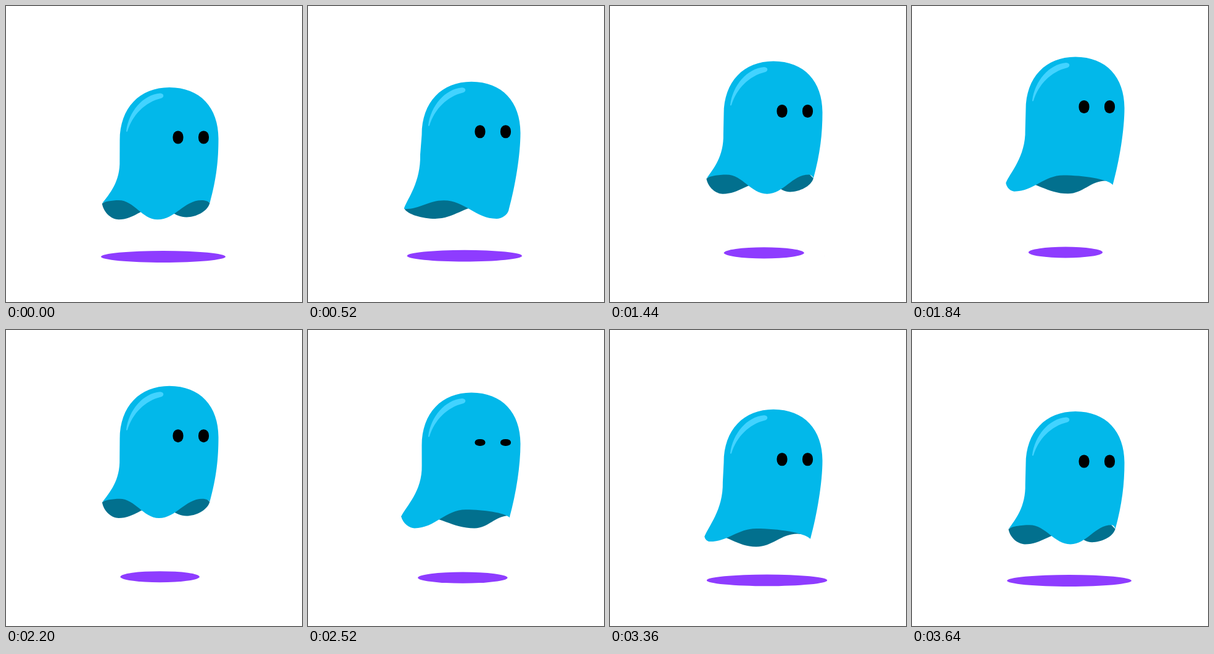
An HTML page for the animation above (3.68 s loop, 480 by 480 pixels).

```html
<!DOCTYPE html>
<html lang="en">
<head>
<meta charset="utf-8">
<title>Floating ghost</title>
<style>
  html, body { margin: 0; width: 100%; height: 100%; overflow: hidden; background: #fff; }
  svg { display: block; width: 100vw; height: 100vh; }
</style>
</head>
<body>
<svg viewBox="0 0 480 480">
  <ellipse id="shadow" fill="#8e3cff"/>
  <g id="ghost">
    <path id="back" fill="#02708e"/>
    <path id="front" fill="#02b8ea"/>
    <path fill="#42d3ff" d="M195 203C199 171 222 144 250 141.5C257 142 256.5 148 252 149.5C225 156 205 177 197 203Q195.5 205 195 203Z"/>
    <g id="eyes">
      <rect x="270.5" y="-10.5" width="17" height="21" rx="8" ry="9.5"/>
      <rect x="312" y="-10.5" width="17" height="21" rx="8" ry="9.5"/>
    </g>
  </g>
</svg>
<script>
const LOOP = 3680, HALF = LOOP / 2, WAVES = 5, STEP = 40;
const $ = id => document.getElementById(id);

const mix = (a, b, k) => a + (b - a) * k;
const curve = (u, a, b) => 3 * (1 - u) ** 2 * u * a + 3 * (1 - u) * u * u * b + u ** 3;
const smooth = u => curve(u, 0, 1);
const cosAt = (p, peak) => Math.cos(2 * Math.PI * (p - peak));
const span = (q, from, to) => (q - from) / (to - from);

// How far each ripple has travelled from the right corner (0) to the left (1).
const frontTrough = q => {
  const u = span(q, .62, 1.8);
  return u < 0 || u > 1 ? -1 : Math.sin(u * Math.PI / 2);
};
const frontCrest = q => span(q, .9, 2.2);
const backTrough = q => .63 * (q - 1) + .16 + .13 * cosAt(q, .82);
const backCrest = q => span(q, .42, 1.6);

// Active ripples of one kind; "fade" grows the ripple out of each corner.
function ripples(travel, y, p, L, R, fade = () => 1) {
  return [p, p + 1, p + 2].map(travel)
    .filter(f => f > 0 && f < 1)
    .map(f => [mix(R[0], L[0], f), mix(f < .5 ? R[1] : L[1], y, Math.min(1, fade(f)))]);
}

// Curve from the left corner through the ripples to the right corner.
function hem(nodes, L, R) {
  const pts = [L, ...nodes.sort((a, b) => a[0] - b[0]), R];
  return pts.slice(1).map((b, i) => {
    const a = pts[i], dx = b[0] - a[0], dy = b[1] - a[1];
    const c1 = i === 0 ? [a[0] + .1 * dx, a[1] + .6 * dy] : [a[0] + .4 * dx, a[1]];
    const c2 = i === pts.length - 2 ? [b[0] - .1 * dx, b[1] - .6 * dy] : [b[0] - .4 * dx, b[1]];
    return `C${c1} ${c2} ${b}`;
  }).join('');
}

function drawBody(p) {
  const s = -cosAt(p, .11);
  const L = [154 - 3 * cosAt(p, .35), 328.5 + 10.5 * s];
  const R = [328 - 3.2 * s, 329.5 + 13 * s];
  const waist = 184 + 2 * cosAt(p, .22);
  const low = 350 + 5 * s;

  const front = hem([
    ...ripples(frontTrough, low, p, L, R, f => 10 * Math.min(f, 1 - f)),
    ...ripples(frontCrest, 319.5 + 6 * s, p, L, R)
  ], L, R);
  const back = hem([
    ...ripples(backTrough, low, p, L, R, f => Math.min(4 * f, 10 * (1 - f))),
    ...ripples(backCrest, 330 + 4 * s, p, L, R)
  ], L, R);

  $('back').setAttribute('d', `M${L}${back}L260 250Z`);
  $('front').setAttribute('d',
    `M${L}${front}C${R[0] + 11} ${R[1] - 40} 344.5 250 344.5 215` +
    `C344.5 165 315 132 265 132C217 132 184.5 165 184.5 218L${waist} 250` +
    `C${waist + 1} ${290 + 6 * s} ${L[0] + 9 - 4 * s} ${L[1] - 16} ${L}Z`);
}

const blink = (t, mid) => smooth(Math.max(0, 1 - Math.abs(t - mid) / 100));

function draw(t) {
  const u = t % HALF / HALF, rising = t < HALF;
  const lift = 49.5 * (rising ? curve(u, 0, .95) : 1 - curve(u, .17, 1));
  const far = rising ? smooth(u) : 1 - smooth(u);
  const open = 1 - .81 * Math.max(blink(t, 1040), blink(t, 2565));

  drawBody(t * WAVES / LOOP % 1);
  $('ghost').setAttribute('transform', `translate(0 ${-lift})`);
  $('eyes').setAttribute('transform', `translate(0 213) scale(1 ${open})`);

  const shape = { cx: 255 - 6 * far, cy: 406.5 - 7 * far, rx: 101 - 41 * far, ry: 9.4 - .4 * far };
  for (const k in shape) $('shadow').setAttribute(k, shape[k]);
}

const start = performance.now();
function tick() {
  const t = (performance.now() - start) % LOOP;
  draw(Math.floor(t / STEP) * STEP);
  requestAnimationFrame(tick);
}
tick();
</script>
</body>
</html>
```
